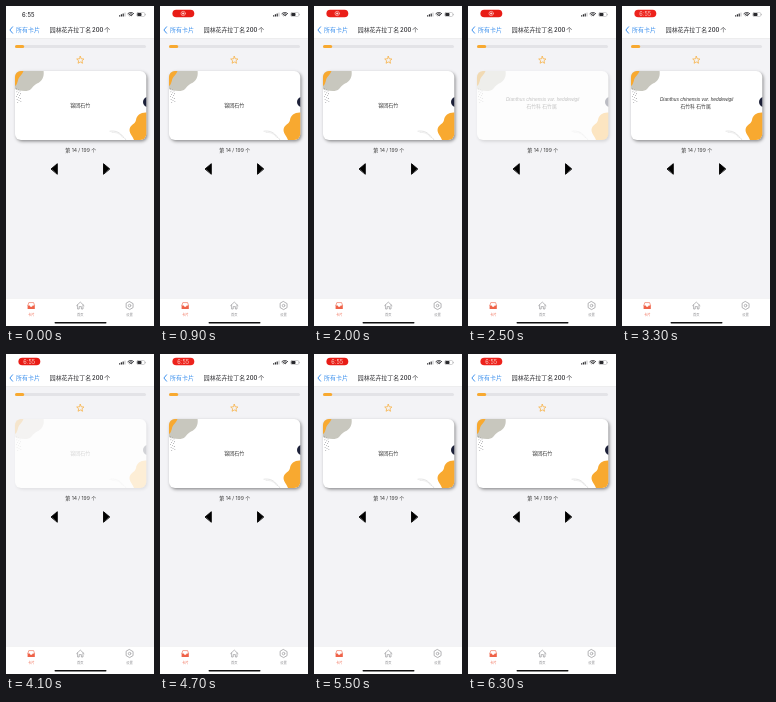
Recreate the animation shown at these times as an HTML page with a canvas. Size 148 px wide and 320 px high, loop 6400 ms.

```html
<!DOCTYPE html>
<html lang="zh">
<head>
<meta charset="utf-8">
<title>Flash cards</title>
<style>
html, body { margin: 0; width: 100%; height: 100%; overflow: hidden; background: #f3f3f6; }
canvas { display: block; width: 148px; height: 320px; }
</style>
</head>
<body>
<canvas id="stage"></canvas>
<script>
const W = 148, H = 320, LOOP = 6400;
const SANS = 'Inter, "Noto Sans CJK SC", "Noto Sans CJK", sans-serif';
const ORANGE = '#f8a930', INK = '#2a2a2e', BLUE = '#3f92ee', GRAY = '#8b8b8f';
const canvas = document.getElementById('stage');
const dpr = window.devicePixelRatio || 1;
canvas.width = W * dpr;
canvas.height = H * dpr;
const ctx = canvas.getContext('2d');

const clamp = v => Math.max(0, Math.min(1, v));
const ease = v => v * v * (3 - 2 * v);
const ramp = (t, from, to) => ease(clamp((t - from) / (to - from)));

function rect(x, y, w, h, color) {
  ctx.fillStyle = color;
  ctx.fillRect(x, y, w, h);
}

function round(x, y, w, h, r, color) {
  ctx.beginPath();
  ctx.roundRect(x, y, w, h, r);
  ctx.fillStyle = color;
  ctx.fill();
}

function circle(x, y, r, color) {
  ctx.beginPath();
  ctx.arc(x, y, r, 0, Math.PI * 2);
  ctx.fillStyle = color;
  ctx.fill();
}

function arc(x, y, r, color, width, from = 0, to = Math.PI * 2) {
  ctx.beginPath();
  ctx.arc(x, y, r, from, to);
  ctx.strokeStyle = color;
  ctx.lineWidth = width;
  ctx.stroke();
}

function fill(d, color) {
  ctx.fillStyle = color;
  ctx.fill(new Path2D(d));
}

function stroke(d, color, width) {
  ctx.strokeStyle = color;
  ctx.lineWidth = width;
  ctx.lineCap = ctx.lineJoin = 'round';
  ctx.stroke(new Path2D(d));
}

function text(str, x, y, size, color, { style = '', align = 'center', family = SANS } = {}) {
  ctx.font = `${style} ${size}px ${family}`;
  ctx.textAlign = align;
  ctx.textBaseline = 'alphabetic';
  ctx.fillStyle = color;
  ctx.fillText(str, x, y);
}

function layer(alpha, draw) {
  if (alpha <= 0) return;
  ctx.save();
  ctx.globalAlpha *= alpha;
  draw();
  ctx.restore();
}

function polygon(n, cx, cy, radius) {
  let d = '';
  for (let i = 0; i < n; i++) {
    const a = i * 2 * Math.PI / n - Math.PI / 2, r = radius(i);
    d += `${i ? 'L' : 'M'}${cx + r * Math.cos(a)} ${cy + r * Math.sin(a)}`;
  }
  return d + 'Z';
}

function statusBar(t) {
  const shown = ramp(t, 60, 380);
  layer(1 - shown, () => text('6:55', 22.2, 10.7, 5.8, INK, { style: '500' }));
  layer(shown, () => {
    const glow = 0.5 + 0.5 * Math.cos(t / 1600 * Math.PI * 2);
    round(12.4, 3.7, 21.9, 7.6, 3.8, `rgb(${232 + 5 * glow}, ${28 + 6 * glow}, ${22 + 6 * glow})`);
    const clock = ramp(t, 3050, 3350);
    layer(1 - clock, () => {
      arc(23.2, 7.5, 2.2, '#ffd9d5', 0.6);
      circle(23.2, 7.5, 1.1, '#ffd9d5');
    });
    layer(clock, () => text('6:55', 23.2, 9.5, 5.5, '#fbc4bd', { style: '500' }));
  });

  for (let i = 0; i < 4; i++) {
    const h = 1.3 + i * 0.9;
    round(113 + i * 1.8, 10.5 - h, 1.2, h, 0.3, i < 3 ? INK : '#c9c9cc');
  }
  for (const r of [1.3, 2.7, 4.1]) {
    arc(124.8, 10.5, r, INK, 0.9, -Math.PI * 0.75, -Math.PI * 0.25);
  }
  ctx.beginPath();
  ctx.roundRect(130.7, 6.5, 8, 4, 1.2);
  ctx.strokeStyle = '#a4a4a7';
  ctx.lineWidth = 0.5;
  ctx.stroke();
  round(131.3, 7.1, 4.2, 2.8, 0.7, INK);
  round(139.3, 7.8, 0.6, 1.4, 0.3, '#a4a4a7');
}

function header() {
  rect(0, 0, W, 32.5, '#fff');
  rect(0, 32.5, W, 0.4, '#d9d9dc');
  stroke('M6.6 20.8L3.9 24L6.6 27.2', BLUE, 1);
  text('所有卡片', 9.9, 26.3, 6, BLUE, { align: 'left' });
  text('园林花卉拉丁名\u200920\u200a0\u2009个'.replace('\u200a', ''), 74, 26.2, 5.9, INK, { style: '500' });
}

function cardArt() {
  // Upper left shapes
  fill('M9 65H37.6C38.4 71 36 75.5 31 77.5C26.5 79.5 26 84.5 20.5 85C15 85.4 12 83.5 9 83Z', '#c8c7be');
  fill('M9 65H17.5C16.5 68.5 13.5 70 12.3 73C11.5 76 11 79 9 80Z', ORANGE);
  for (let i = 0; i < 15; i++) {
    circle(10.2 + (i * 1.9) % 5, 83 + i * 0.95, 0.4, '#44444a');
  }
  // Lower right shapes
  circle(142, 96, 5, '#1c2038');
  fill('M141 106.5C135 106 130.5 109 130 114C129.5 118 124.5 118.5 123.6 123C123 127.5 126.5 129.5 128 134H141Z', ORANGE);
  stroke('M104 125.2C109 124.5 113 126 115.5 129C117 131 119 132 120 134', '#b4b4b4', 0.35);
  stroke('M106 126.5C110 126 114 127.5 117 131.5', '#c6c6c6', 0.3);
}

function card(t) {
  const opening = t < 3200;
  const [press, swap, done] = opening ? [2150, 2440, 2700] : [3740, 4080, 4390];
  const fade = ramp(t, press, press + 150) * (1 - ramp(t, swap, done));
  const alpha = 1 - 0.82 * fade;
  const back = opening ? t >= swap : t < swap;

  ctx.save();
  ctx.shadowColor = `rgba(0, 0, 0, ${0.42 * alpha})`;
  ctx.shadowBlur = 3.2 * dpr;
  ctx.shadowOffsetX = 1.2 * dpr;
  ctx.shadowOffsetY = 1.4 * dpr;
  const tone = 255 - 2 * fade;
  round(9, 65, 131.3, 69, 6, `rgb(${tone}, ${tone}, ${tone})`);
  ctx.restore();

  layer(alpha, () => {
    ctx.beginPath();
    ctx.roundRect(9, 65, 131.3, 69, 6);
    ctx.clip();
    cardArt();
    if (back) {
      text('Dianthus chinensis var. heddewigii', 74.6, 95.2, 4.8, '#3a3a3a',
        { style: 'italic', family: '"Liberation Sans", sans-serif' });
      text('石竹科 石竹属', 73.6, 101.9, 4.85, '#3a3a3a');
    } else {
      text('锦团石竹', 74.3, 101, 5, '#3a3a3a');
    }
  });
}

function controls() {
  round(9, 39, 131, 3.1, 1.55, '#e3e3e7');
  round(9, 39, 131 * 14 / 199, 3.1, 1.55, ORANGE);
  stroke(polygon(10, 74.3, 54.2, i => i % 2 ? 1.75 : 3.8), ORANGE, 0.7);
  text('第 14 / 199 个', 74.7, 145.7, 5, '#3a3a3a');
  for (const [x, dir] of [[45.3, 1], [103.5, -1]]) {
    const d = `M${x} 162.8L${x + 6 * dir} 157.7V167.9Z`;
    fill(d, '#000');
    stroke(d, '#000', 0.9);
  }
}

function tabBar() {
  rect(0, 292, W, 28, '#fff');
  rect(0, 292, W, 0.4, '#e0e0e2');

  const red = '#ef6248';
  fill('M21.6 299.6H23.7L24.4 300.8H26L26.7 299.6H28.8V302.9H21.6Z', red);
  stroke('M21.8 299.6L22.8 296.6H27.6L28.6 299.6', red, 0.6);

  stroke('M70.6 299.6L74.3 296.1L78 299.6M71.6 299V303H73.2V300.6H75.4V303H77V299', GRAY, 0.6);
  stroke(polygon(6, 123.6, 299.6, () => 4), GRAY, 0.65);
  arc(123.6, 299.6, 1.3, GRAY, 0.6);

  text('卡片', 25.2, 309.5, 3.3, red);
  text('首页', 74.3, 309.5, 3.3, GRAY);
  text('设置', 123.6, 309.5, 3.3, GRAY);
  round(48.5, 315.9, 52, 1.5, 0.75, '#111');
}

function frame(now) {
  const t = now % LOOP;
  ctx.setTransform(dpr, 0, 0, dpr, 0, 0);
  rect(0, 0, W, H, '#f3f3f6');
  header();
  statusBar(t);
  controls();
  card(t);
  tabBar();
}

const start = performance.now();
function tick() {
  frame(performance.now() - start);
  requestAnimationFrame(tick);
}
tick();
</script>
</body>
</html>
```
